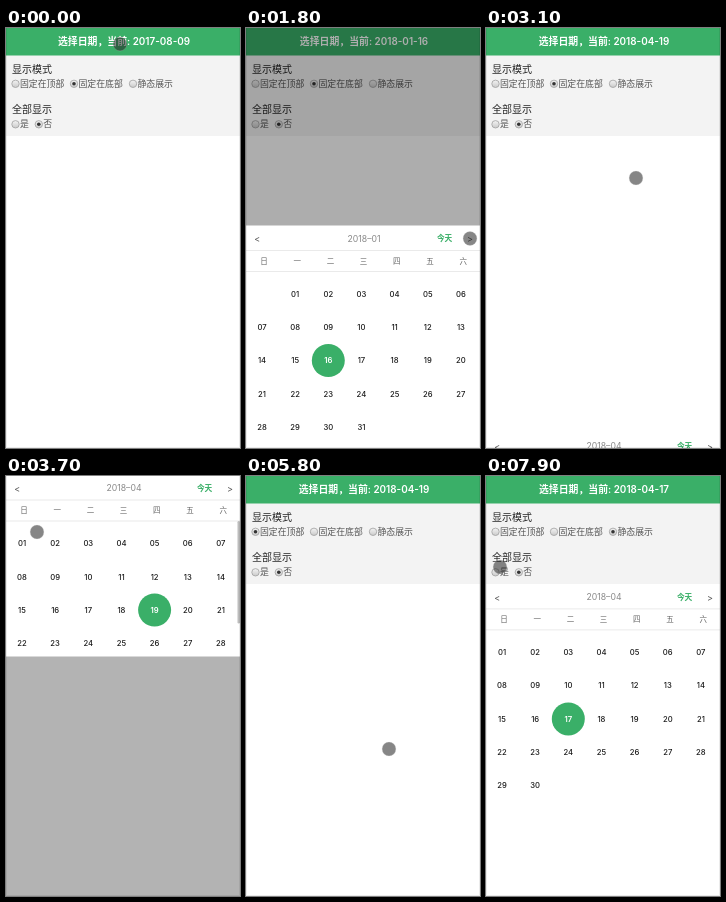
Animation, 234 px wide and 420 px high, one loop 8 s. Source, as an HTML page:

```html
<!DOCTYPE html>
<html lang="zh-CN">
<head>
<meta charset="utf-8">
<title>选择日期</title>
<style>
html, body { margin: 0; width: 100%; height: 100%; overflow: hidden; background: #fff; }
svg { display: block; width: 234px; height: 420px; font-family: Inter, "Noto Sans CJK SC", "Noto Sans CJK", sans-serif; }
</style>
</head>
<body>
<svg id="stage" viewBox="0 0 234 420">
  <defs>
    <linearGradient id="knob" x2="0" y2="1"><stop stop-color="#f4f4f4"/><stop offset="1" stop-color="#cacaca"/></linearGradient>
    <clipPath id="clip"><rect id="clipBox" y="-0.9" width="234"/></clipPath>
  </defs>
</svg>
<script>
const LOOP = 8000, FULL = 224, GREEN = '#3aaf68', SHADE = 0.32;
const stage = document.getElementById('stage');
const clipBox = document.getElementById('clipBox');

const set = (node, attrs) => { for (const k in attrs) node.setAttribute(k, attrs[k]); };
const show = (node, on) => node.setAttribute('visibility', on ? 'visible' : 'hidden');
function el(tag, attrs, parent = stage) {
  const node = document.createElementNS('http://www.w3.org/2000/svg', tag);
  set(node, attrs);
  return parent.appendChild(node);
}

// y is the middle of the line
function label(str, x, y, size, fill, parent = stage, anchor = 'start', weight = 400) {
  const t = el('text', { x, y: y + size * 0.37, 'font-size': size, fill, 'text-anchor': anchor, 'font-weight': weight }, parent);
  t.textContent = str;
  return t;
}
function radio(str, x, y) {
  el('circle', { cx: x, cy: y, r: 3.7, fill: 'url(#knob)', stroke: '#a0a0a0', 'stroke-width': 0.8 });
  const dot = el('circle', { cx: x, cy: y, r: 1.8, fill: '#333' });
  label(str, x + 4.4, y - 0.5, 8.9, '#555');
  return dot;
}

// page
el('rect', { width: 234, height: 420, fill: '#fff' });
el('rect', { y: 27, width: 234, height: 81, fill: '#f3f3f3' });
el('rect', { width: 234, height: 27.5, fill: GREEN });
const title = label('', 118, 13.7, 9.9, '#fff', stage, 'middle', 600);
label('显示模式', 6, 41, 10, '#222');
const modes = {
  top: radio('固定在顶部', 9.5, 55.8),
  bottom: radio('固定在底部', 68, 55.8),
  still: radio('静态展示', 127, 55.8)
};
label('全部显示', 6, 81.3, 10, '#222');
show(radio('是', 9.5, 96.3), false);
radio('否', 32.8, 96.3);

// calendar panel
const cellAt = i => [16 + (i % 7) * 33.15, 67.5 + Math.floor(i / 7) * 33.25];
const shade = el('rect', { width: 234, height: 420, fill: '#000' });
const panel = el('g', { 'clip-path': 'url(#clip)' });
el('rect', { y: -1.5, width: 234, height: 320, fill: '#fff' }, panel);
for (const y of [23.5, 44.5]) el('rect', { y, width: 234, height: 1, fill: '#eaeaea' }, panel);
label('<', 11.3, 12.4, 9, '#555', panel, 'middle');
label('>', 224, 12.4, 9, '#555', panel, 'middle');
const month = label('', 118, 12.2, 8.7, '#888', panel, 'middle');
label('今天', 198.6, 12, 7.7, GREEN, panel, 'middle', 600);
[...'日一二三四五六'].forEach((d, i) => label(d, 18 + i * 33.2, 34.6, 7.5, '#666', panel, 'middle'));
const ring = el('circle', { r: 16.5, fill: GREEN }, panel);
const cells = Array.from({ length: 42 }, (_, i) => label('', ...cellAt(i), 7.7, '#1a1a1a', panel, 'middle', 500));
const thumb = el('rect', { x: 231.5, y: 45, width: 2.5, rx: 1.2, fill: '#bdbdbd' }, panel);

el('path', { d: 'M.5 0V419.5H233.5V0', fill: 'none', stroke: '#000', 'stroke-opacity': 0.08 });
const pointer = el('circle', { r: 6.9, fill: '#222', 'fill-opacity': 0.55, stroke: '#ccc', 'stroke-opacity': 0.4, 'stroke-width': 0.6 });

// every tap: when, and what it hits (a number picks that day)
const script = [
  [40, 'open'], [760, 16], [1080, 'next'], [1260, 'next'], [1480, 'next'], [1640, 'next'], [1800, 'next'],
  [2180, 11], [2640, 'today'], [2900, 'close'], [3550, 'top'], [4150, 'next'], [4300, 'today'],
  [4500, 12], [4780, 'today'], [5420, 'close'], [6370, 'still'], [6900, 'next'], [7300, 'prev'],
  [7760, 17], [7940, 'yes']
];
const rest = { bottom: 198.5, top: 0, still: 108.9 };
const onPanel = { prev: [11, 12], next: [224, 12], today: [198, 11] };
const onPage = { open: [114, 16], top: [31, 56], still: [145, 56], yes: [14, 91] };
const outside = { bottom: [150, 150], top: [143, 273] };

const firstDay = s => new Date(s.y, s.m, 1).getDay();

function place(hit, s) {
  if (hit === 'close') return outside[s.mode];
  if (onPage[hit]) return onPage[hit];
  const [x, y] = onPanel[hit] || cellAt(firstDay(s) + hit - 1);
  return [x, y + rest[s.mode]];
}
function apply(hit, s) {
  const turn = n => { const d = new Date(s.y, s.m + n, 1); return { y: d.getFullYear(), m: d.getMonth() }; };
  if (hit > 0) return { d: hit };
  switch (hit) {
    case 'next': return turn(1);
    case 'prev': return turn(-1);
    case 'today': return { y: 2018, m: 3, d: 19 };
    case 'open': return { open: 1 };
    case 'close': return { open: 0 };
    case 'top': return { mode: 'top', open: 1 };
    case 'still': return { mode: 'still' };
  }
}

const states = [{ t: 0, at: onPage.open, y: 2017, m: 7, d: 9, mode: 'bottom', open: 0 }];
for (const [t, hit] of script) {
  const s = states[states.length - 1];
  states.push({ ...s, ...apply(hit, s), t, at: place(hit, s) });
}

// cubic-bezier(.25,.1,.25,1)
function ease(p) {
  if (p <= 0 || p >= 1) return Math.min(1, Math.max(0, p));
  const curve = (s, a, b) => 3 * a * s * (1 - s) ** 2 + 3 * b * s * s * (1 - s) + s ** 3;
  let lo = 0, hi = 1;
  for (let i = 0; i < 18; i++) {
    const mid = (lo + hi) / 2;
    if (curve(mid, 0.25, 0.25) < p) lo = mid; else hi = mid;
  }
  return curve(lo, 0.1, 1);
}
const openness = (t, dur) =>
  states.reduce((v, s, i) => i ? v + (s.open - states[i - 1].open) * ease((t - s.t) / dur) : v, 0);
const two = n => String(n).padStart(2, '0');

function drawDate(s) {
  const ym = [s.y, two(s.m + 1)], first = firstDay(s), count = new Date(s.y, s.m + 1, 0).getDate();
  title.textContent = `选择日期，当前: ${ym.join('-')}-${two(s.d)}`;
  month.textContent = ym.join('–');
  cells.forEach((cell, i) => {
    const day = i - first + 1, on = day === s.d;
    cell.textContent = day > 0 && day <= count ? two(day) : '';
    set(cell, { fill: on ? '#fff' : '#1a1a1a', 'font-weight': on ? 600 : 500 });
  });
  const [cx, cy] = cellAt(first + s.d - 1);
  set(ring, { cx, cy });
}

function drawPanel(t, mode) {
  const still = mode === 'still';
  const h = still ? 311 : FULL * openness(t, 300);
  const y = rest[mode] + (mode === 'bottom' ? FULL - h : 0);
  set(panel, { transform: `translate(0 ${y})` });
  show(panel, h > 1);
  set(clipBox, { height: h + 0.9 });
  set(shade, { opacity: still ? 0 : SHADE * openness(t, 220) });
  const track = Math.max(0, h - 45);
  set(thumb, { height: track * track / (FULL - 45), opacity: h < FULL - 1 ? 1 : 0 });
}

// the pointer waits, then hurries to the next tap
function drawPointer(t, i) {
  const a = states[i], b = states[i + 1] || a;
  const from = Math.max(a.t + 40, b.t - 240), to = Math.max(from + 1, b.t - 40);
  const p = Math.min(1, Math.max(0, (t - from) / (to - from)));
  const [cx, cy] = a.at.map((v, k) => v + (b.at[k] - v) * p);
  set(pointer, { cx, cy });
}

let shown = -1;
function draw(t) {
  const i = states.filter(s => s.t <= t).length - 1, s = states[i];
  if (i !== shown) {
    drawDate(s);
    for (const k in modes) show(modes[k], k === s.mode);
    shown = i;
  }
  drawPanel(t, s.mode);
  drawPointer(t, i);
}

const start = performance.now();
function tick() {
  draw((performance.now() - start) % LOOP);
  requestAnimationFrame(tick);
}
tick();
</script>
</body>
</html>
```
